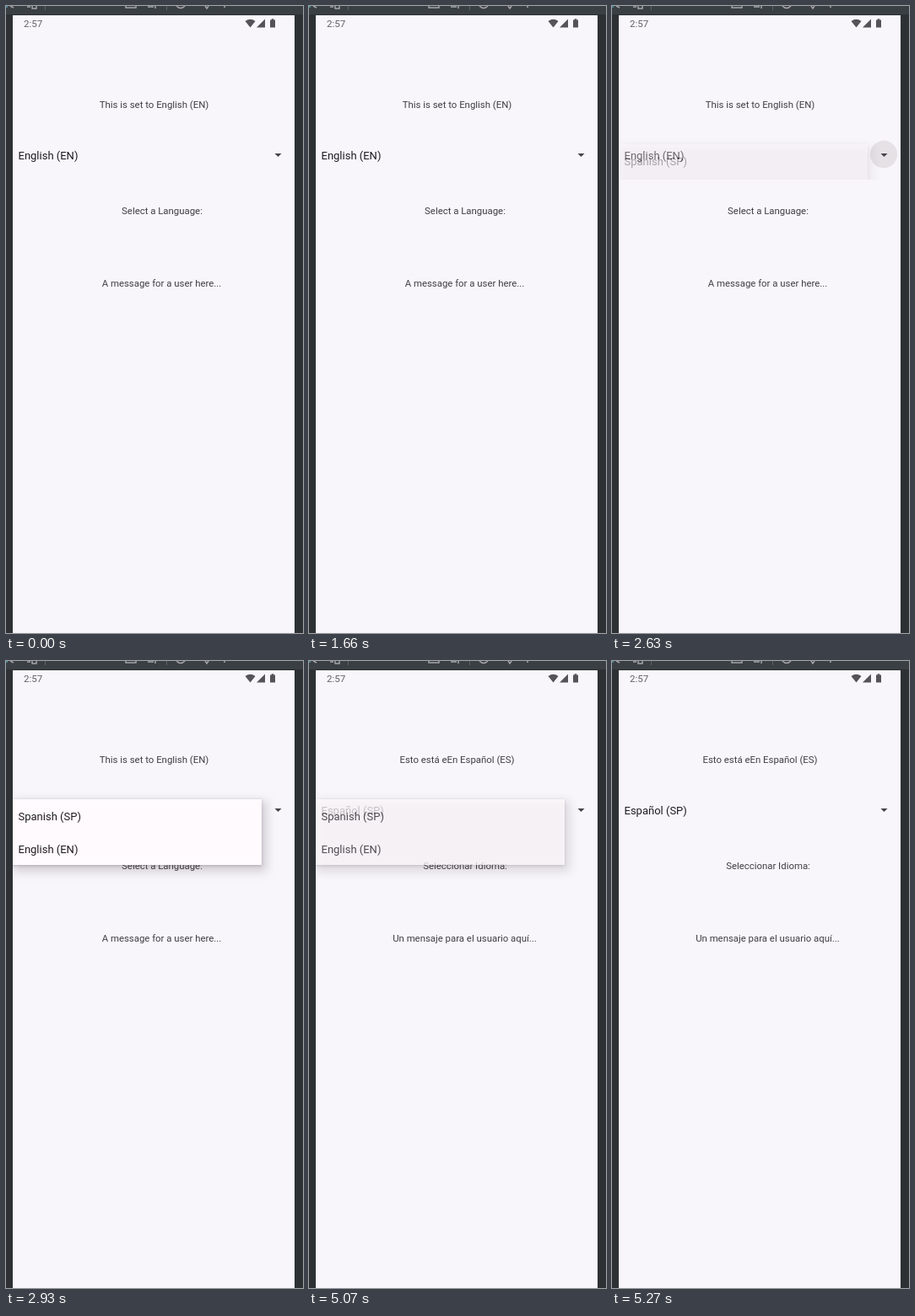
Write an HTML page that moves like this. It is 352 by 744 pixels and loops after 8 s.

```html
<!DOCTYPE html>
<html lang="en">
<head>
<meta charset="utf-8">
<title>Language picker</title>
<style>
  html, body { margin: 0; width: 100%; height: 100%; overflow: hidden; background: #2d3134; }
  body { position: relative; font-family: Roboto, sans-serif; }
  svg { position: absolute; left: 0; top: 0; display: block; }
  text { font-size: 11.4px; fill: #403e42; }
  .mid { text-anchor: middle; }
  .pick { font-size: 13px; fill: #1e1c20; }
  .clock { font-size: 11.6px; fill: #636166; }

  .en, .es, .ripple, .pop { animation: 8s infinite; }
  .en { animation-name: en; animation-timing-function: step-end; }
  .es { animation-name: es; animation-timing-function: step-end; }
  @keyframes en { 0% { opacity: 1 } 63.375%, 100% { opacity: 0 } }
  @keyframes es { 0% { opacity: 0 } 63.375%, 100% { opacity: 1 } }

  .ripple {
    animation-name: ripple; animation-timing-function: linear;
    transform-origin: 322px 176px;
  }
  @keyframes ripple {
    0%, 26% { opacity: 0; transform: scale(.4) }
    27.5% { opacity: .9; transform: scale(1) }
    29.5%, 32.375% { opacity: 1; transform: scale(1) }
    35.5%, 100% { opacity: 0; transform: scale(1) }
  }

  .screen { position: absolute; left: 8px; top: 11px; width: 334px; height: 733px; overflow: hidden; }
  .pop {
    position: absolute; left: 0; top: 153px; width: 295px; height: 78px;
    animation-name: pop; animation-timing-function: linear;
  }
  /* the shade is solid, so it shows through the fading menu */
  .shade::before {
    content: ""; position: absolute; inset: 2px -6px -8px 0;
    background: rgba(70, 62, 70, .21); filter: blur(6px);
  }
  .menu { background: #fefafd; box-shadow: 0 1px 3px rgba(70, 62, 70, .25); }
  .menu span {
    position: absolute; left: 6.5px; height: 20px;
    font-size: 13px; line-height: 20px; white-space: nowrap; color: #1e1c20;
  }
  @keyframes pop {
    0%, 32.2% { opacity: 0; clip-path: inset(-12px -34px 46px -34px) }
    33.8% { opacity: .8; clip-path: inset(-12px -34px 24px -34px) }
    35% { opacity: 1; clip-path: inset(-12px -34px 0 -34px) }
    36.6%, 63% { opacity: 1; clip-path: inset(-12px -34px -34px -34px) }
    63.75% { opacity: .5 }
    64.25% { opacity: .23 }
    64.75% { opacity: .1 }
    65.875%, 100% { opacity: 0; clip-path: inset(-12px -34px -34px -34px) }
  }
</style>
</head>
<body>
<svg width="352" height="744" viewBox="0 0 352 744">
  <rect width="352" height="744" fill="#2d3134"/>
  <rect width="352" height="10" fill="#3a3f44"/>
  <rect x="8" y="11" width="334" height="733" fill="#f8f6fb"/>

  <!-- cropped toolbar icons -->
  <g fill="none" stroke="#a4a6a8" stroke-width="1.5">
    <path d="M5 0l4 2M25 1h4M31 0v3h5V0M142 0v2h12V0M168 1h7M177 0v3M202 0q5 5 10 0M236 0l2 3 2-3M259 0v2"/>
    <path d="M0 1h2" stroke="#4a9cb0"/>
    <path d="M46.5 0v5M190.5 0v5" stroke="#5c6268" stroke-width="1"/>
  </g>

  <text class="clock" x="21" y="25">2:57</text>
  <g fill="#555358">
    <path d="M283.5 18q6-4.6 12 0l-6 7.500z"/>
    <path d="M307 15.5v10h-10z"/>
    <path d="M313 16.5h1.700v-1.200h2.600v1.200h1.700v9h-6z"/>
  </g>

  <circle class="ripple" cx="322" cy="176" r="16.2" fill="#e2dee1"/>
  <path d="M318.5 175h8l-4 4z" fill="#454347"/>

  <g class="en">
    <text class="mid" x="175.5" y="121">This is set to English (EN)</text>
    <text class="pick" x="14.5" y="181.5">English (EN)</text>
    <text class="mid" x="185" y="247">Select a Language:</text>
    <text class="mid" x="184.5" y="333">A message for a user here...</text>
  </g>
  <g class="es">
    <text class="mid" x="175.5" y="121">Esto está eEn Español (ES)</text>
    <text class="pick" x="14.5" y="181.5">Español (SP)</text>
    <text class="mid" x="185" y="247">Seleccionar Idioma:</text>
    <text class="mid" x="184.5" y="333">Un mensaje para el usuario aquí...</text>
  </g>
</svg>
<div class="screen">
  <div class="pop shade"></div>
  <div class="pop menu">
    <span style="top:10.5px">Spanish (SP)</span>
    <span style="top:49.5px">English (EN)</span>
  </div>
</div>
</body>
</html>
```
